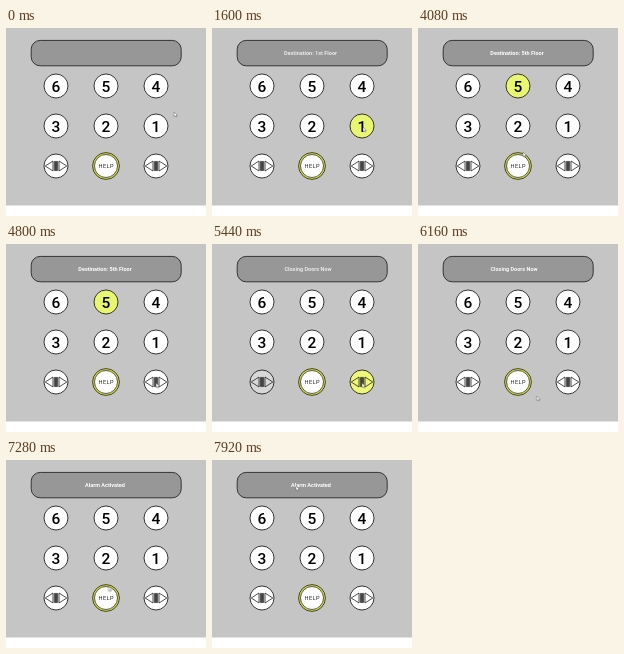
Write an HTML page that moves like this. It is 200x188 px and loops after 8 s.

```html
<!DOCTYPE html>
<html lang="en">
<head>
<meta charset="utf-8">
<title>Elevator panel</title>
<style>
  html, body { margin: 0; width: 100%; height: 100%; overflow: hidden; background: #fff; }
  svg { display: block; width: 100vw; height: 100vh; }
  text { font-family: Roboto, Inter, sans-serif; text-anchor: middle; }
  .digit { font-size: 15.5px; font-weight: 500; }
  .help { font-size: 5.6px; letter-spacing: .45px; fill: #222; }
  .message { font-size: 5.5px; font-weight: 700; fill: #fff; opacity: 0; }
  .button { fill: #fff; stroke: #222; stroke-width: .9; }

  /* One percent of the loop is 80 ms. */
  .message, .button, #panel, #cursor { animation: 8s linear infinite; }

  #key1 { animation-name: key1; }
  #key5 { animation-name: key5; }
  #open { animation-name: open; }
  #close { animation-name: close; }
  @keyframes key1 { 0%, 15.9% { fill: #fff } 17%, 41.9% { fill: #e8f670 } 43%, 100% { fill: #fff } }
  @keyframes key5 { 0%, 41.9% { fill: #fff } 43%, 61.9% { fill: #e8f670 } 63%, 100% { fill: #fff } }
  @keyframes open { 0%, 61.9% { fill: #fff } 63%, 73% { fill: #d8d8d8 } 75%, 100% { fill: #fff } }
  @keyframes close { 0%, 61.9% { fill: #fff } 63%, 73% { fill: #eef776 } 75%, 100% { fill: #fff } }

  #first { animation-name: first; }
  #fifth { animation-name: fifth; }
  #closing { animation-name: closing; }
  #alarm { animation-name: alarm; }
  @keyframes first { 0%, 16% { opacity: 0 } 21%, 42% { opacity: 1 } 43%, 100% { opacity: 0 } }
  @keyframes fifth { 0%, 43% { opacity: 0 } 48%, 62% { opacity: 1 } 63%, 100% { opacity: 0 } }
  @keyframes closing { 0%, 63% { opacity: 0 } 69%, 81% { opacity: .95 } 82%, 100% { opacity: 0 } }
  @keyframes alarm { 0%, 82% { opacity: 0 } 83%, 100% { opacity: 1 } }

  #panel { animation-name: blink; animation-timing-function: step-end; }
  @keyframes blink {
    0% { opacity: 1 } 83% { opacity: 0 } 88% { opacity: 1 }
    93% { opacity: 0 } 98%, 100% { opacity: 1 }
  }

  #cursor { animation-name: travel; animation-timing-function: ease-in-out; }
  @keyframes travel {
    0%, 3% { transform: translate(168px, 84px) }
    14%, 26% { transform: translate(151px, 99px) }
    38%, 47% { transform: translate(104px, 67px) }
    51% { transform: translate(105px, 124px) }
    59%, 71% { transform: translate(150px, 139px) }
    75% { transform: translate(126px, 159px) }
    80%, 89% { transform: translate(104.5px, 138px) }
    98%, 100% { transform: translate(84px, 26px) }
  }
</style>
</head>
<body>
<svg viewBox="0 0 200 188" preserveAspectRatio="none">
  <defs>
    <g id="doors" stroke="#222" stroke-width=".8" stroke-linejoin="round">
      <path d="M-10.8 0L-3-5V5ZM10.8 0L3-5V5Z" fill="none"/>
      <path d="M-1.7-4.6h3.4v9.2h-3.4z" fill="#444" stroke-width=".5"/>
    </g>
  </defs>
  <rect width="200" height="177.5" fill="#c5c5c5"/>
  <g id="panel">
    <rect x="25.2" y="12.4" width="150" height="25.4" rx="9" fill="#979797" stroke="#333"/>
    <text class="message" id="first" x="98.5" y="27">Destination: 1st Floor</text>
    <text class="message" id="fifth" x="99" y="27">Destination: 5th Floor</text>
    <text class="message" id="closing" x="96" y="27">Closing Doors Now</text>
    <text class="message" id="alarm" x="99" y="27">Alarm Activated</text>
    <g id="keys"></g>
    <g transform="translate(50 138)"><circle class="button" id="open" r="12"/><use href="#doors"/></g>
    <g transform="translate(150 138)"><circle class="button" id="close" r="12"/><use href="#doors"/></g>
    <g transform="translate(100 138)">
      <circle r="13.4" fill="#d5e02c" stroke="#333" stroke-width=".9"/>
      <circle r="11.5" fill="#fff" stroke="#333" stroke-width=".8"/>
      <text class="help" x=".2" y="2.1">HELP</text>
    </g>
  </g>
  <path id="cursor" d="M0 0V4.6L1.1 3.6 1.9 5.2 2.7 4.8 2 3.3H3.4Z" fill="#fff" stroke="#555" stroke-width=".45"/>
</svg>
<script>
  const keys = document.getElementById("keys");
  keys.innerHTML = [6, 5, 4, 3, 2, 1].map((digit, i) => {
    const x = 50 + i % 3 * 50, y = 58 + Math.floor(i / 3) * 40;
    return `<g transform="translate(${x} ${y})">
      <circle class="button" id="key${digit}" r="12"/>
      <text class="digit" y="5.5">${digit}</text></g>`;
  }).join("");
</script>
</body>
</html>
```
